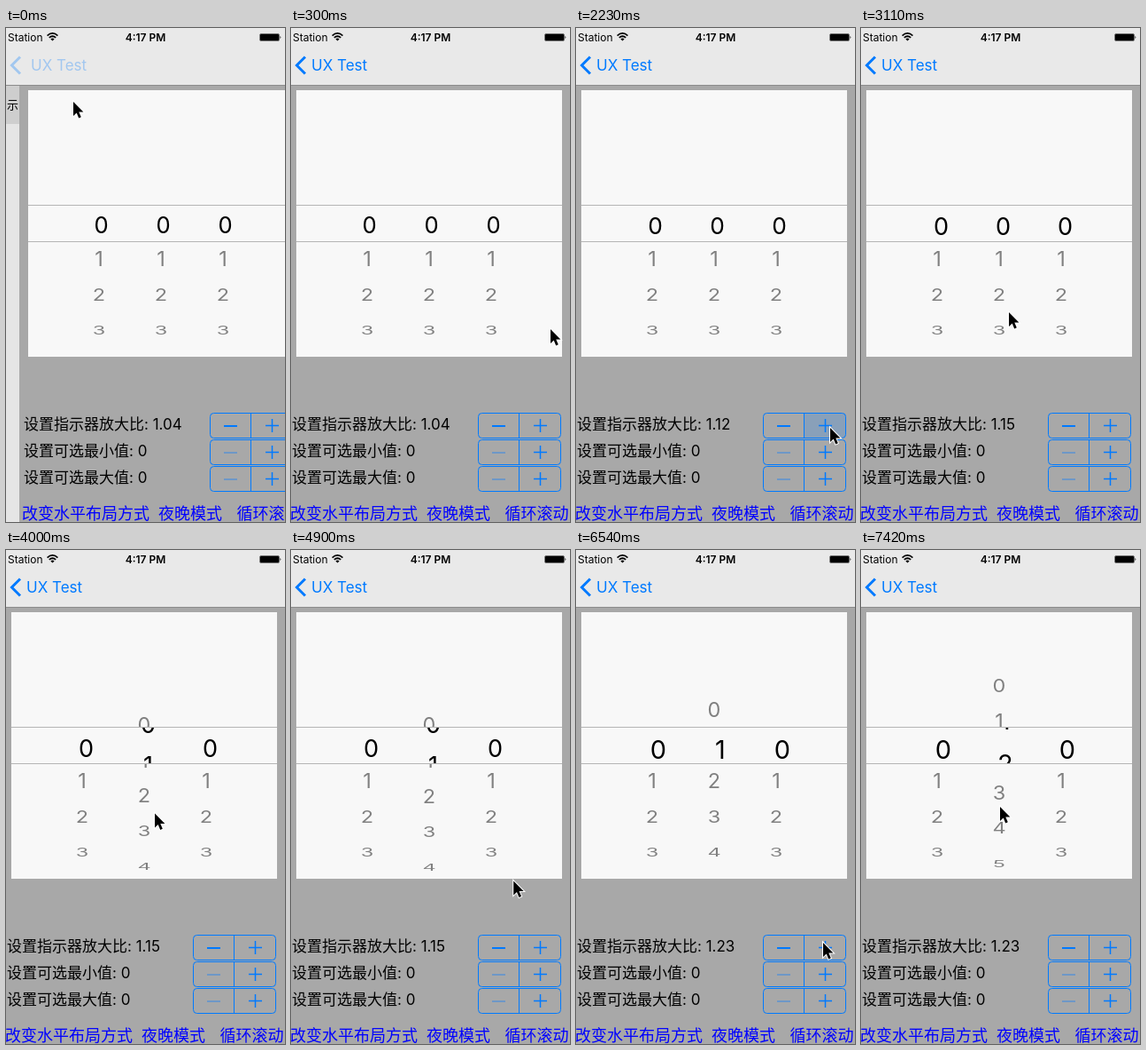
These frames come from a looping animation (315x556 px, 8 s). An HTML page:

```html
<!DOCTYPE html>
<html lang="zh-CN">
<head>
<meta charset="utf-8">
<title>Picker</title>
<style>
  html, body { margin: 0; width: 100%; height: 100%; overflow: hidden; background: #a8a8a8; }
  svg { display: block; width: 100%; height: 100%; }
  text { font-family: Inter, "Noto Sans CJK SC", "Noto Sans CJK", sans-serif; }
  .status { font-size: 12px; }
  .label { font-size: 17px; }
  .link { font-size: 18px; fill: #00f; }
  .digit { font-size: 23.5px; text-anchor: middle; }
  .line { fill: none; stroke: #007aff; }
</style>
</head>
<body>
<svg viewBox="0 0 315 556">
  <defs>
    <clipPath id="outside"><path d="M6 70H306V199H6ZM6 241H306V370H6Z"/></clipPath>
    <clipPath id="band"><path d="M6 200H306V240H6Z"/></clipPath>
  </defs>

  <g id="previous">
    <path fill="#e5e5e5" d="M0 64H20V556H0Z"/>
    <path fill="#cecece" d="M0 65H20V108H0Z"/>
    <text x="1" y="91" font-size="13">示</text>
  </g>

  <g id="view">
    <path fill="#a8a8a8" d="M-4 64H320V556H-4Z"/>
    <path fill="#f8f8f8" d="M6 70H306V370H6Z"/>
    <g id="rows" fill="#808080" clip-path="url(#outside)"></g>
    <g clip-path="url(#band)"><g id="lens"></g></g>
    <path stroke="#b5b5b5" d="M6 199.5H306M6 240.5H306"/>
    <text class="label" x="1" y="452">设置指示器放大比<tspan id="ratio"></tspan></text>
    <text class="label" x="1" y="482">设置可选最小值: 0</text>
    <text class="label" x="1" y="512">设置可选最大值: 0</text>
    <path id="pressed" fill="#007aff" fill-opacity=".19" d="M258 433.5H301a4 4 0 0 1 4 4V457a4 4 0 0 1-4 4H258Z"/>
    <g id="steppers" class="line"></g>
    <text class="link" x="-1" y="552.5">改变水平布局方式</text>
    <text class="link" x="153" y="552.5">夜晚模式</text>
    <text class="link" x="241.5" y="552.5">循环滚动</text>
  </g>

  <path fill="#e9e9e9" d="M0 0H315V64H0Z"/>
  <path stroke="#8c8c8c" d="M0 64.5H315"/>
  <text class="status" x="2" y="14.5">Station</text>
  <g fill="none" stroke="#000" stroke-width="1.7">
    <path d="M46.6 8.6Q52.5 3.2 58.4 8.6M48.8 10.9Q52.5 7.6 56.2 10.9"/>
    <path fill="#000" stroke="none" d="M50.4 12.4Q52.5 10.7 54.6 12.4L52.5 14.5Z"/>
  </g>
  <text class="status" x="157.5" y="14.5" font-weight="600" text-anchor="middle">4:17 PM</text>
  <rect x="286.5" y="6.5" width="22" height="8" rx="1.5" stroke="#777"/>
  <path d="M309.5 8.8q1.8 1.7 0 3.5Z"/>
  <g id="back">
    <path class="line" stroke-width="3" d="M16 32.5L6.5 42L16 51.5"/>
    <text id="backText" x="23" y="48" font-size="17" fill="#007aff">UX Test</text>
  </g>

  <path id="cursor" stroke="#fff" stroke-width="2" paint-order="stroke"
    d="M0 0V16L3.7 12.6L6.2 18.4L8.8 17.3L6.3 11.6H11.4Z"/>
</svg>

<script>
const LOOP = 8000, STEP = 148.4, LAST_STEP = 50;
const COLUMNS = [86, 156, 226], ROW = 40, CENTER = 220, DIGITS = 8;

// Where the pointer rests or turns
const stops = [
  { step: 0, x: 76, y: 83 },
  { step: 2, x: 293, y: 339 },
  { step: 4, x: 287, y: 450 },
  { step: 17, x: 287, y: 450 },
  { step: 21, x: 167, y: 320 },
  { step: 24, x: 168, y: 277 },
  { step: 28, x: 168, y: 303 },
  { step: 31, x: 168, y: 303 },
  { step: 35, x: 279, y: 442 },
  { step: 44, x: 279, y: 442 },
  { step: 48, x: 160, y: 316 },
  { step: 50, x: 157, y: 289 }
];
const bursts = [{ from: 4, to: 17, clicks: 11 }, { from: 36, to: 44, clicks: 8 }];

const byId = id => document.getElementById(id);
const mix = (a, b, p) => a + (b - a) * p;
const progress = (from, to, step) => Math.min(1, Math.max(0, (step - from) / (to - from)));
const easeOut = p => 1 - (1 - p) ** 2;
const smooth = p => p * p * (3 - 2 * p);

function add(parent, tag, attrs, text = '') {
  const node = document.createElementNS('http://www.w3.org/2000/svg', tag);
  for (const key in attrs) node.setAttribute(key, attrs[key]);
  node.textContent = text;
  return parent.appendChild(node);
}

function show(node, visible) {
  node.setAttribute('display', visible ? 'inline' : 'none');
}

function pointerAt(step) {
  const b = stops.find(stop => stop.step > step) || stops[stops.length - 1];
  const a = stops[stops.indexOf(b) - 1];
  const p = progress(a.step, b.step, step);
  return { x: mix(a.x, b.x, easeOut(p)), y: mix(a.y, b.y, p) };
}

// The middle wheel follows the pointer while dragged, then snaps to a row
function scrollAt(step) {
  const dragged = (grab, now) => (pointerAt(grab).y - pointerAt(now).y) / ROW;
  const first = dragged(21, Math.min(31, Math.max(21, step)));
  const second = dragged(48, Math.max(48, step));
  return mix(first, 1, smooth(progress(31, 37, step))) + second;
}

function clicksAt(step) {
  return bursts.reduce((sum, { from, to, clicks }) =>
    sum + Math.floor(clicks * progress(from, to, step) ** 1.3), 0);
}

const makeDigits = parent => COLUMNS.map(() =>
  Array.from({ length: DIGITS }, (_, n) => add(parent, 'text', { class: 'digit', y: 8.5 }, n)));
const rowDigits = makeDigits(byId('rows'));
const lensDigits = makeDigits(byId('lens'));

for (let i = 0; i < 3; i++) {
  const box = add(byId('steppers'), 'g', { transform: `translate(211.5 ${433.5 + 30 * i})` });
  add(box, 'rect', { width: 93, height: 28, rx: 4 });
  add(box, 'path', { d: 'M46 0V28' });
  add(box, 'path', { d: 'M15.5 14.5H30.5', 'stroke-width': i ? 1 : 2, opacity: i ? .7 : 1 });
  add(box, 'path', { d: 'M62.5 14H77.5M70 6.5V21.5', 'stroke-width': 1.5 });
}

function place(node, x, y, sx, sy, visible) {
  show(node, visible);
  node.setAttribute('transform', `translate(${x} ${y}) scale(${sx} ${sy})`);
}

function render(step) {
  const slide = (1 - progress(0, 2, step)) ** 2;
  byId('view').setAttribute('transform', `translate(${19 * slide} 0)`);
  show(byId('previous'), slide > 0);
  byId('back').setAttribute('opacity', 1 - .7 * slide);
  byId('backText').setAttribute('x', 23 + 5 * slide);

  const clicks = clicksAt(step);
  const ratio = 1.04 + clicks * .01;
  const zoom = clicks ? ratio : 1.09;
  byId('ratio').textContent = ': ' + ratio.toFixed(2);
  show(byId('pressed'), step % 2 && bursts.some(b => step > b.from && step <= b.to));

  const middle = scrollAt(step);
  COLUMNS.forEach((x, column) => {
    for (let n = 0; n < DIGITS; n++) {
      const offset = (n - (column === 1 ? middle : 0)) * ROW;
      const squash = Math.cos(offset / 120);
      place(rowDigits[column][n], x, CENTER + offset, 1, squash, Math.abs(offset) < 155);
      place(lensDigits[column][n], x + 30 * (zoom - 1), CENTER + 20 * (zoom - 1) + offset * zoom,
        zoom, zoom, Math.abs(offset) < ROW);
    }
  });

  const { x, y } = pointerAt(step);
  byId('cursor').setAttribute('transform', `translate(${x} ${y})`);
}

const start = performance.now();
function tick() {
  const time = (performance.now() - start) % LOOP;
  render(Math.min(LAST_STEP, Math.floor((time + 12) / STEP)));
  requestAnimationFrame(tick);
}
tick();
</script>
</body>
</html>
```
